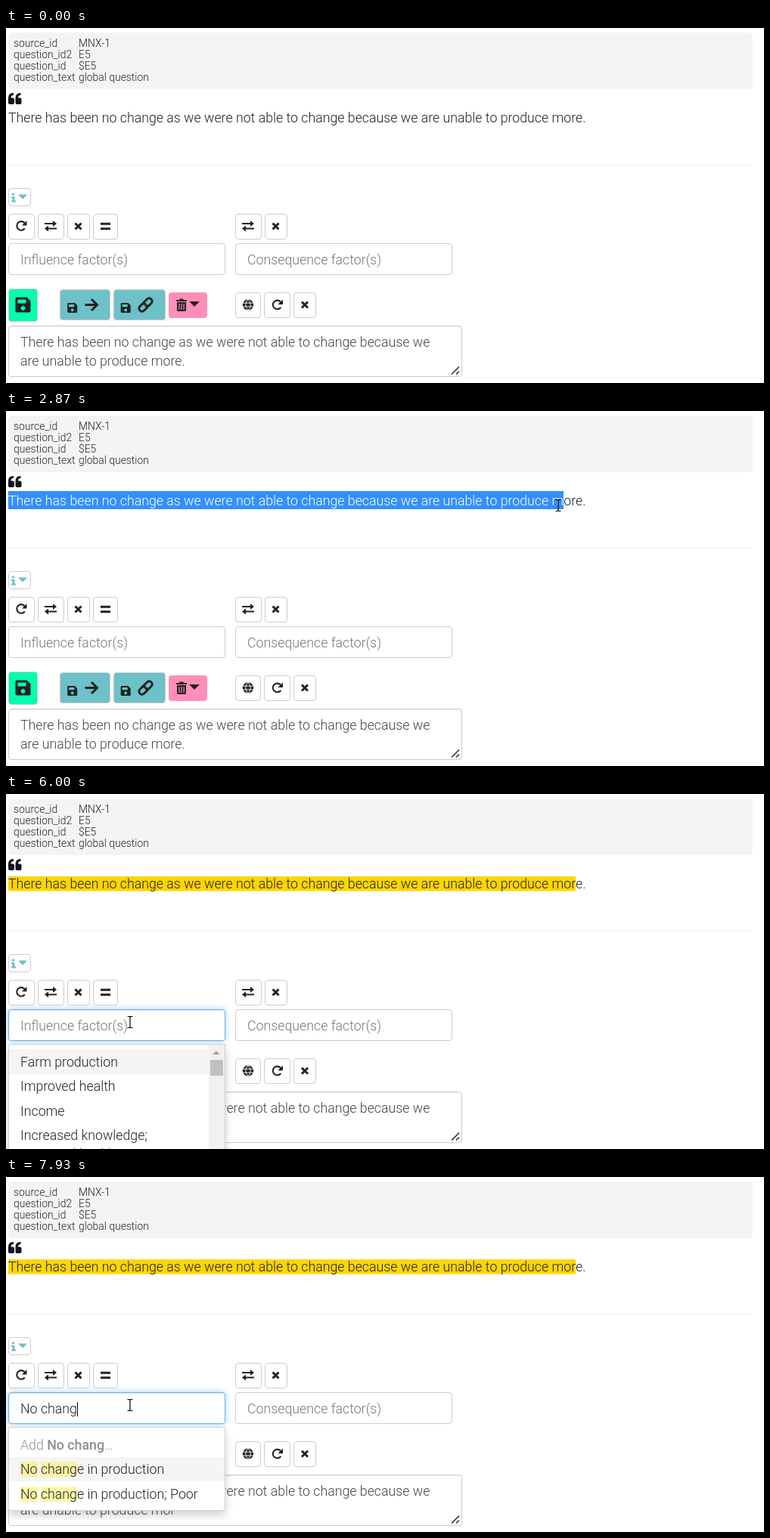
An HTML page for the animation above (8 s loop, 1002 px wide and 470 px high).

```html
<!DOCTYPE html>
<html lang="en">
<head>
<meta charset="utf-8">
<style>
html, body { margin: 0; width: 100%; height: 100%; overflow: hidden; background: #fff; }
body { position: relative; font: 300 17.75px/25px Roboto, sans-serif; color: #1f2226; }
div, svg { position: absolute; box-sizing: border-box; white-space: pre; }
svg { left: 0; top: 0; width: 1002px; height: 470px; }
.box { border: 1px solid #ccc; border-radius: 4px; background: #fff; }
.area { box-shadow: inset 0 1px 1px #0001; }
.focus { border-color: #66afe9; box-shadow: inset 0 1px 1px #0001, 0 0 8px #66afe999; }
.meta { font-size: 13.9px; line-height: 15px; }
.hint { color: #777; }
.caret { display: inline-block; width: 1px; height: 19px; margin-right: -1px; vertical-align: -4px; background: #000; }
.select { background: #338fff; color: #fff; padding: 3px 0 1px; }
.cite { background: linear-gradient(#ffd500, #ffd500) 0 0 / 100% 19.5px no-repeat; color: inherit; }
#menu { left: 3px; top: 331px; width: 287px; padding: 6px 0 5px; background: #fff; border: 1px solid #d0d0d0;
  border-radius: 0 0 4px 4px; box-shadow: 0 6px 12px #0000002d; overflow: hidden; }
#menu p { margin: 0; padding: 4.5px 15px 3px; }
#menu .active { background: #f5f5f5; }
#menu .add { opacity: .5; }
#menu b { font-weight: 500; }
#menu mark { background: #ffed2866; color: inherit; }
.track { right: 0; top: 0; width: 21px; height: 200px; background: #f1f1f1; }
.thumb { left: 2px; top: 20px; width: 17px; height: 21px; background: #c1c1c1; }
.up { left: 5px; top: 8px; border: 5px solid transparent; border-top: 0; border-bottom-color: #a3a3a3; }
</style>
</head>
<body>
<script>
const SENTENCE = 'There has been no change as we were not able to change because we are unable to produce more.';
const TYPED = 'No chang';
const KEY_TIMES = [6530, 6800, 7000, 7130, 7270, 7530, 7730, 7870];
const LIST_TIMES = [6600, 6870, 7000, 7130, 7400, 7600, 7730, 7930];
const DEFAULTS = ['Farm production', 'Improved health', 'Income', 'Increased knowledge;\nImproved health'];
const FACTORS = ['No change in production', 'No longer paying school fees', 'No change in production; Poor', 'No school choices'];

function add(x, y, w, h, className, html = '', style = '') {
  const el = document.createElement('div');
  el.className = className;
  el.innerHTML = html;
  el.style.cssText = `left:${x}px;top:${y}px;${w ? `width:${w}px;height:${h}px;` : ''}${style}`;
  document.body.append(el);
  return el;
}

// Metadata panel and quotation
add(3, 6, 984, 75, '', '', 'background:#f4f4f4;border-radius:5px');
add(10, 13, 0, 0, 'meta', 'source_id\nquestion_id2\nquestion_id\nquestion_text');
add(96, 13, 0, 0, 'meta', 'MNX-1\nE5\n$E5\nglobal question');
const quote = add(3, 107, 0, 0, '');
add(3, 181, 984, 1, '', '', 'background:#ececec');

// Buttons and fields
add(3, 212, 30, 24, 'box');
for (const [x, w] of [[3, 35], [42, 35], [81, 30], [115, 33], [303, 35], [342, 30]]) add(x, 246, w, 34, 'box');
for (const [x, w] of [[303, 34], [341, 35], [380, 30]]) add(x, 350, w, 34, 'box');
add(3, 345, 39, 44, 'box', '', 'background:#00ffaf');
add(71, 346, 67, 41, 'box', '', 'background:#6dc1c8');
add(142, 346, 69, 41, 'box', '', 'background:#6dc1c8');
add(215, 350, 51, 34, '', '', 'background:#ff8fb8;border-radius:4px');
const field = add(3, 285, 287, 42, 'box');
const fieldText = add(19, 295, 0, 0, '');
add(303, 285, 287, 42, 'box');
add(319, 295, 0, 0, 'hint', 'Consequence factor(s)');
add(3, 394, 600, 68, 'box area');
const note = add(19, 404, 0, 0, '', '', 'color:#444');

// Icons, each drawn around its own centre
const solid = d => `<path fill-rule="evenodd" d="${d}"/>`;
const line = (d, w, color = 'currentColor') => `<path fill="none" stroke="${color}" stroke-width="${w}" d="${d}"/>`;
const ICONS = {
  quote: solid('M0 7Q0 0 6.5 0h.5v3H6.5Q3.5 3 3.5 6.5H6q2 0 2 2v4.5q0 2-2 2H2q-2 0-2-2z'),
  info: solid('M-2-6h3v3h-3zM-3-1.5h4.5v5.5h1.5v2h-6v-2h1.5v-3.5h-1.5z'),
  down: solid('M-6-3H6L0 3z'),
  redo: line('M4.7-3.6A5.8 5.8 0 1 0 4.8 3.3', 2.1) + solid('M7.5-7v6.5H1z'),
  swap: line('M-8-3H4M8 3.5H-4', 2.2) + solid('M3-7L8-3 3 1zM-3-.5l-5 4 5 4z'),
  cross: line('M-4-4L4 4M4-4L-4 4', 3),
  equal: line('M-6.5-3.2h13m-13 6.4h13', 3),
  globe: '<circle r="7.2"/>' + line('M-7-2.4H7M-7 2.4H7M0-7.5Q-6.5 0 0 7.5Q6.5 0 0-7.5', .9, '#fff'),
  save: solid('M-8-10H5l5 5V8q0 2-2 2H-8q-2 0-2-2V-8q0-2 2-2zM-7-7v5H4v-5zM0 1.5a3 3 0 1 0 .01 0z'),
  next: line('M-8.5 0H7M0-7.5L7.5 0 0 7.5', 3),
  link: '<g transform="rotate(-45) scale(1.12)">' + line('M2 3.5H-6a3.5 3.5 0 0 1 0-7h3a3.5 3.5 0 0 1 3.5 3.5M-2-3.5H6a3.5 3.5 0 0 1 0 7h-3A3.5 3.5 0 0 1-.5 0', 2.6) + '</g>',
  trash: solid('M-7-7h4l1-1.5h4l1 1.5h4v2H-7zM-6-4H6V6.500q0 1.500-1.500 1.500h-9Q-6 8-6 6.500zM-3.700-2v8h1.200v-8zM-.6-2v8h1.200v-8zM2.500-2v8h1.200v-8z'),
  grip: line('M-5 5L5-5M1 5L5 1', 1.4),
  arrow: '<path fill="#fff" stroke="#000" d="M.5.5v15.500l3.500-3.300 2.500 5.800 2.600-1.100-2.500-5.600h4.900z"/>',
  beam: line('M-3.5-7.5h2.5l1 1 1-1h2.5M0-6.5v13M-3.5 7.5h2.5l1-1 1 1h2.5', 1.2),
};
const icon = (name, x, y, scale = 1, color = '#222') =>
  `<g transform="translate(${x} ${y}) scale(${scale})" fill="${color}" color="${color}">${ICONS[name]}</g>`;
const layer = html => {
  document.body.insertAdjacentHTML('beforeend', `<svg viewBox="0 0 1002 470">${html}</svg>`);
  return document.body.lastChild;
};
const TEAL = '#6dc1c8';
layer([
  ['quote', 3, 86, 1, '#111520'], ['quote', 12.5, 86, 1, '#111520'],
  ['info', 10, 224.5, 1, TEAL], ['down', 22, 223.5, 1, TEAL],
  ['redo', 20, 262], ['swap', 59, 262], ['cross', 95.5, 262.5], ['equal', 131.5, 262.5],
  ['swap', 320, 262], ['cross', 356.5, 262.5],
  ['save', 22.5, 366.5], ['save', 87.7, 370.5, .65], ['next', 113, 366.5],
  ['save', 158.2, 370.5, .65], ['link', 184.5, 366.5], ['trash', 232, 367], ['down', 249, 365.5, 1.15],
  ['globe', 320, 366.5], ['redo', 358.5, 366.5], ['cross', 395, 366.5],
  ['grip', 594, 453.5],
].map(args => icon(...args)).join(''));

const menu = add(0, 0, 0, 0, '');
menu.id = 'menu';
menu.style.cssText = '';
const pointer = layer('');

// Pointer path: time, x, y
const PATH = [
  [400, 797, 429], [1200, 8, 109], [1400, 1, 114], [1530, 3, 116], [1730, 5, 117],
  [1800, 14, 126], [2270, 650, 157], [2530, 766, 148], [2870, 730, 125], [3130, 748, 126],
  [3270, 749, 126], [3400, 754, 126], [4130, 754, 126], [4870, 190, 288], [5000, 178, 292],
  [5200, 166, 302], [5600, 166, 302], [5670, 163.5, 302],
];

function pointerAt(t) {
  const i = PATH.findIndex(p => p[0] > t);
  if (i < 0) return PATH.at(-1).slice(1);
  const [t0, x0, y0] = PATH[i - 1], [t1, x1, y1] = PATH[i];
  let k = (t - t0) / (t1 - t0);
  if (t1 - t0 > 600) k = k * k * (3 - 2 * k);
  return [x0 + (x1 - x0) * k, y0 + (y1 - y0) * k];
}

const typedBy = (times, t) => TYPED.slice(0, times.filter(k => t >= k).length);

function menuHtml(query) {
  const bar = query.length < 5 ? '<div class="track"><div class="up"></div><div class="thumb"></div></div>' : '';
  const row = (text, i) => `<p class="${i ? '' : 'active'}">${text}</p>`;
  if (!query) return DEFAULTS.map(row).join('') + bar;
  const tokens = query.trim().split(' ');
  const match = new RegExp(tokens.join('|'), 'gi');
  return `<p class="add">Add <b>${query}</b>…</p>` + FACTORS
    .filter(f => tokens.every(word => f.toLowerCase().includes(word.toLowerCase())))
    .map(f => f.replace(match, '<mark>$&</mark>')).map(row).join('') + bar;
}

function setHtml(el, html) {
  if (el.shown !== html) el.innerHTML = el.shown = html;
}

function draw(t) {
  const visible = t >= 400;
  const [x, y] = visible ? pointerAt(t) : [0, 0];
  const cited = t >= 3870, open = t >= 5400;
  const beam = t >= 1800 && !(t > 4200 && y > 136 && y < 284);
  setHtml(pointer, visible ? icon(beam ? 'beam' : 'arrow', Math.round(x), Math.round(y), 1, '#000') : '');

  const count = cited ? 91 : t >= 1800 ? Math.floor(x / 8.2) : 0;
  setHtml(quote, `<mark class="${cited ? 'cite' : 'select'}">${SENTENCE.slice(0, count)}</mark>${SENTENCE.slice(count)}`);
  setHtml(note, SENTENCE.slice(0, t >= 4400 ? 91 : 93).replace('we are', 'we\nare'));

  const typed = typedBy(KEY_TIMES, t);
  const caret = open && (t < 6000 || t >= 6530) ? '<span class="caret"></span>' : '';
  setHtml(fieldText, typed ? typed + caret : caret + '<span class="hint">Influence factor(s)</span>');
  field.classList.toggle('focus', open);
  menu.hidden = !open;
  if (open) setHtml(menu, menuHtml(typedBy(LIST_TIMES, t)));
}

const start = performance.now();
function tick() {
  const t = (performance.now() - start) % 8000;
  const step = Math.floor((t + 4) * 15 / 1000) % 120;
  draw(Math.round(step * 100 / 15) * 10);
  requestAnimationFrame(tick);
}
tick();
</script>
</body>
</html>
```
